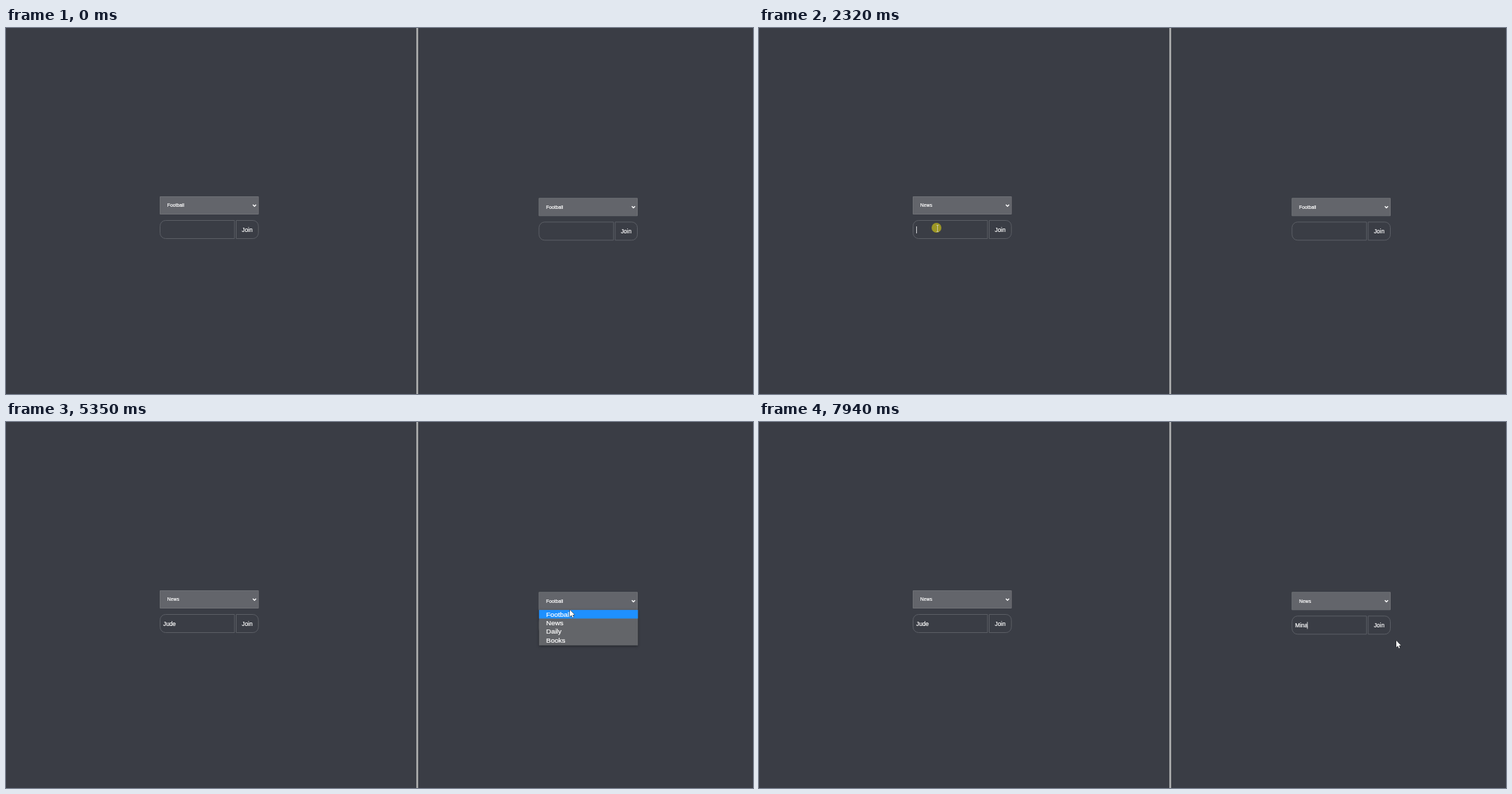
An HTML page with a canvas that plays this animation: 1069 px wide and 524 px high, repeating every 8000 ms.

```html
<!DOCTYPE html>
<html lang="en">
<head>
<meta charset="utf-8">
<title>Join a room</title>
<style>
html, body { margin: 0; width: 100%; height: 100%; overflow: hidden; background: #3a3d45; }
canvas { display: block; }
</style>
</head>
<body>
<canvas id="stage" width="1069" height="524"></canvas>
<script>
const ctx = document.getElementById('stage').getContext('2d');
const LOOP = 8000, STEP = 69.2, START = 190, EXIT = 7940;
const ROOMS = ['Football', 'News', 'Daily', 'Books'];
const ROW = 12.3, BLINK = 545, CLICK = 210;

// Each visitor travels to the select, opens it, picks a room, then types a name.
const PANES = [
  { x: 0, y: 0, name: 'Jude', from: [945, 456], select: [261, 252], option: [254, 286],
    leave: START, arrive: 1020, open: 1340, pick: 2050, focus: 2320, type: 3410, gap: 155 },
  { x: 542.3, y: 2.3, name: 'Mina', from: [255, 287], select: [814, 253], option: [800, 284],
    leave: 4330, arrive: 4880, open: 5060, pick: 6040, focus: 6360, type: 7320, gap: 113 }
];

const within = (t, a, b) => t >= a && t < b;
const progress = (t, a, b) => Math.min(1, Math.max(0, (t - a) / (b - a)));
const smooth = k => k * k * (3 - 2 * k);
const easeOut = k => 1 - (1 - k) ** 2;
const mix = (a, b, k) => a.map((v, i) => v + (b[i] - v) * k);

function pointerAt(time) {
  if (time >= EXIT) return [912, 313];
  const t = START + Math.floor((time - START + 4) / STEP) * STEP;
  const p = PANES[t < PANES[1].leave ? 0 : 1];
  return t < p.open
    ? mix(p.from, p.select, smooth(progress(t, p.leave, p.arrive)))
    : mix(p.select, p.option, easeOut(progress(t, p.open, p.pick - 150)));
}

function label(text, x, y, size) {
  ctx.font = `${size}px "Liberation Sans", Arial, sans-serif`;
  ctx.fillStyle = ctx.strokeStyle = '#fff';
  ctx.lineWidth = .2;
  ctx.fillText(text, x, y);
  ctx.strokeText(text, x, y);
}

function box(x, y, w, h, radii, stroke, fill = 'transparent') {
  ctx.beginPath();
  ctx.roundRect(x + .5, y + .5, w - 1, h - 1, radii);
  ctx.fillStyle = fill;
  ctx.fill();
  ctx.strokeStyle = stroke;
  ctx.lineWidth = 1;
  ctx.stroke();
}

function menu(hot) {
  ctx.save();
  ctx.shadowColor = 'rgba(0,0,0,.4)';
  ctx.shadowBlur = 4;
  ctx.shadowOffsetY = 1;
  ctx.fillStyle = '#636569';
  ctx.fillRect(220.5, 266.6, 141.5, 50.9);
  ctx.restore();
  ctx.fillStyle = '#1e90ff';
  ctx.fillRect(220.5, 266.8 + hot * ROW, 141.5, ROW);
  ROOMS.forEach((room, i) => label(room, 230.8, 276.4 + i * ROW, 9.85));
}

function pane(p, t, pointerY) {
  ctx.save();
  ctx.translate(p.x, p.y);

  box(220, 241, 141.7, 26, 0, '#6d6f74', '#63656b');
  label(ROOMS[t < p.pick ? 0 : 1], 230.8, 256.4, 6.8);
  ctx.beginPath();
  ctx.moveTo(353.3, 253);
  ctx.lineTo(355.6, 255.3);
  ctx.lineTo(357.9, 253);
  ctx.strokeStyle = '#fff';
  ctx.lineWidth = 1.4;
  ctx.stroke();

  box(220, 275, 107.5, 27, [8, 0, 0, 8], '#5b5e65');
  box(329, 275, 32.7, 27, [0, 8, 8, 0], '#5b5e65');
  label('Join', 337.6, 291.7, 8.25);

  const count = Math.max(0, Math.floor((t - p.type) / p.gap) + 1);
  const typed = p.name.slice(0, count);
  label(typed, 225, 291.7, 8.25);
  const typingEnd = p.type + p.gap * (p.name.length - 1) + BLINK;
  if (within(t, p.focus, p.focus + BLINK) || within(t, p.type, typingEnd)) {
    ctx.fillStyle = '#d0d2d4';
    ctx.fillRect(225 + Math.floor(ctx.measureText(typed).width), 284, 1, 10);
  }
  if (within(t, p.open, p.pick)) menu(pointerY - p.y > 279 ? 1 : 0);
  ctx.restore();
}

function arrow() {
  ctx.beginPath();
  [[0, 0], [0, 9.6], [2.2, 7.6], [3.7, 11], [5.2, 10.3], [3.7, 7], [6.7, 7]]
    .forEach(([x, y]) => ctx.lineTo(x, y));
  ctx.closePath();
  ctx.strokeStyle = '#202226';
  ctx.lineWidth = 1;
  ctx.stroke();
  ctx.fillStyle = '#fff';
  ctx.fill();
}

function beam() {
  ctx.fillStyle = 'rgba(215,215,215,.7)';
  ctx.fillRect(1, -3, 1, 8);
  ctx.fillRect(0, -4, 3, 1);
  ctx.fillRect(0, 5, 3, 1);
}

function pointer(t, x, y) {
  const click = PANES.flatMap(p => [p.open - 150, p.focus])
    .find(c => within(t, c, c + CLICK));
  if (click !== undefined) {
    const alpha = .66 * (1 - progress(t, click + 140, click + CLICK));
    ctx.fillStyle = `rgba(209,199,22,${alpha})`;
    ctx.beginPath();
    ctx.arc(x, y, 7, 0, 7);
    ctx.fill();
  }
  const overInput = PANES.some(p => t >= p.pick &&
    within(x - p.x, 220, 328) && within(y - p.y, 275, 302));
  ctx.save();
  ctx.translate(Math.round(x), Math.round(y));
  overInput ? beam() : arrow();
  ctx.restore();
}

function draw(t) {
  ctx.fillStyle = '#3a3d45';
  ctx.fillRect(0, 0, 1069, 524);
  ctx.fillStyle = '#b6b7b7';
  ctx.fillRect(587.3, 0, 2.4, 524);
  const [x, y] = pointerAt(t);
  PANES.forEach(p => pane(p, t, y));
  if (t >= START) pointer(t, x, y);
}

const start = performance.now();
function tick() {
  draw((performance.now() - start) % LOOP);
  requestAnimationFrame(tick);
}
tick();
</script>
</body>
</html>
```
